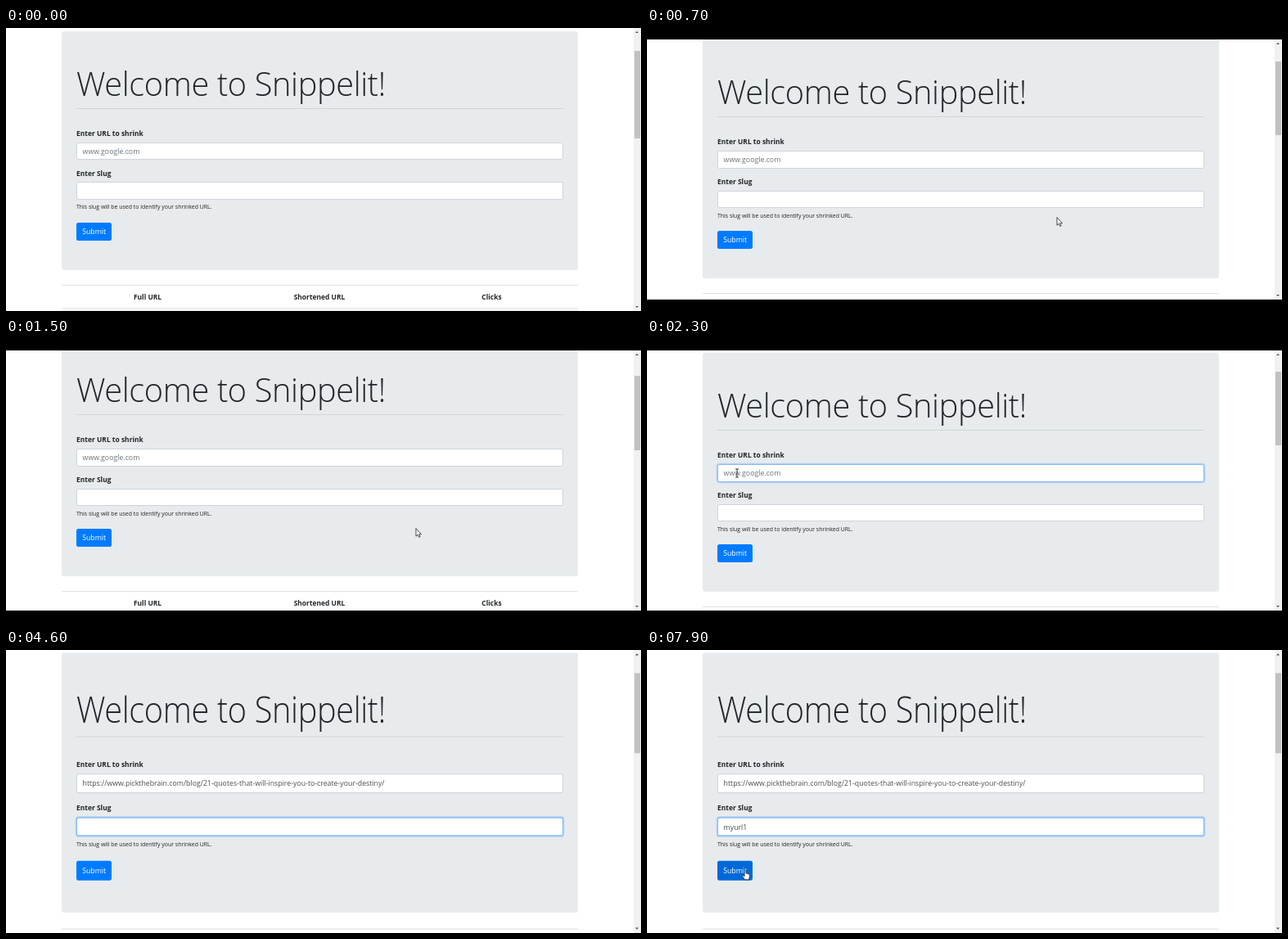
These frames come from a looping animation (776 by 346 pixels, 8000 ms). An HTML page:

```html
<!DOCTYPE html>
<html lang="en">
<head>
<meta charset="utf-8">
<title>Welcome to Snippelit!</title>
<style>
html, body { margin: 0; width: 100%; height: 100%; overflow: hidden; background: #000; }
#stage { position: absolute; left: 0; top: 0; width: 776px; height: 346px; overflow: hidden; background: #000; }
#view { position: absolute; left: 0; width: 776px; overflow: hidden; background: #fff; transform-origin: 0 0; }
#page { position: absolute; left: 0; top: 0; width: 767px; height: 500px;
  font: 8.78px/14px "Open Sans", "Noto Sans", sans-serif; color: #212529; }
#page div, #bar div, #cursors svg { position: absolute; box-sizing: border-box; white-space: nowrap; }
#page .jumbo { left: 68px; top: 14px; width: 631px; height: 292px; border-radius: 3px; background: #e7ebed; }
#page .title { left: 86px; top: 53px; font-size: 39.8px; line-height: 50px; font-weight: 300; letter-spacing: -.4px; }
#page .rule { left: 86px; width: 594.5px; top: 108px; height: 1px; background: #d2d5d8; }
#page .label { left: 86px; font-size: 8.45px; font-weight: 700; }
#page .field { left: 86px; width: 594.5px; height: 21.5px; padding-left: 6.6px; line-height: 21px;
  border: 1px solid #ced4da; border-radius: 2.5px; background: #fff; color: #495057; }
#page .hint { left: 86px; top: 222.5px; font-size: 6.95px; }
#page .button { left: 86px; top: 248.3px; width: 43.3px; height: 21.5px; border-radius: 2.5px;
  line-height: 22.5px; text-align: center; color: #fff; }
#page .line { left: 68px; width: 631px; background: #dee2e6; }
#page .head { top: 332px; width: 210px; text-align: center; font-size: 8.45px; font-weight: 700; }
#page .row { left: 68px; top: 354px; width: 631px; height: 40px; background: #f2f2f2; }
#page .link { top: 361px; color: #2f7de1; line-height: 13.3px; }
#caret { display: inline-block; width: 1px; height: 12px; background: #777; vertical-align: -2.5px; }
#bar { position: absolute; right: 0; top: 0; width: 9.5px; height: 100%; background: #f1f1f1; }
#thumb { left: 1.2px; width: 7.3px; background: #c1c1c1; }
.arrow { left: 2.6px; border: 2.2px solid transparent; }
.up { top: 1.6px; border-bottom: 2.6px solid #505050; }
.down { bottom: 1.6px; border-top: 2.6px solid #505050; }
#cursors svg { left: 0; top: 0; overflow: visible; width: 12px; height: 16px; }
</style>
</head>
<body>
<div id="stage">
  <div id="view">
    <div id="page">
      <div class="jumbo"></div>
      <div class="title">Welcome to Snippelit!</div>
      <div class="rule"></div>
      <div class="label" style="top:132px">Enter URL to shrink</div>
      <div class="field" id="url" style="top:150px"><span id="urlText"></span><span id="caret"></span></div>
      <div class="label" style="top:181px">Enter Slug</div>
      <div class="field" id="slug" style="top:198.7px"></div>
      <div class="hint">This slug will be used to identify your shrinked URL.</div>
      <div class="button" id="submit">Submit</div>
      <div class="line" style="top:324px;height:1px"></div>
      <div class="head" style="left:68px">Full URL</div>
      <div class="head" style="left:278px">Shortened URL</div>
      <div class="head" style="left:488.5px">Clicks</div>
      <div class="line" style="top:352.5px;height:1.2px"></div>
      <div class="row"></div>
      <div class="link" style="left:74.5px">https://www.pickthebrain.com/blog/21-quotes-<br>that-will-inspire-you-to-create-your-destiny/</div>
      <div class="link" style="left:284.5px">https://snippelit.herokuapp.com/api/myurl1</div>
      <div style="left:591px;top:361px">0</div>
    </div>
    <div id="bar"><div class="arrow up"></div><div id="thumb"></div><div class="arrow down"></div></div>
  </div>
  <div id="cursors">
    <svg id="arrow"><path d="M.5 .5V10.2L2.7 8.2L4.2 11.4L5.6 10.8L4.2 7.7H7Z" fill="#fff" stroke="#222" stroke-width=".8"/></svg>
    <svg id="beam"><path d="M-2 -5H2M0 -5V5M-2 5H2" fill="none" stroke="#222" stroke-width=".9"/></svg>
    <svg id="hand"><path d="M-.9 1Q0 -.6 1 1V4.5L5 5.6Q5.8 6 5.6 7.5L4.6 12.3H-.4L-3.4 8.2Q-3.6 6.6 -2 7.2L-.9 8.2Z" fill="#fff" stroke="#222" stroke-width=".8"/></svg>
  </div>
</div>
<script>
const $ = id => document.getElementById(id);
const LOOP = 8000, STEP = 100, FULL = 346, SHORT = 318;
const ADDRESS = "https://www.pickthebrain.com/blog/21-quotes-that-will-inspire-you-to-create-your-destiny/";

// [time, value] pairs
const scroll = [[900, 0], [1000, -8], [1100, -36], [1200, -53], [1300, -53], [1400, -38],
  [1500, -16], [1600, -4], [1700, 1], [1800, 3]];
const urlFocus = [[2100, 0], [2300, 1], [4100, 1], [4300, 0]];
const slugFocus = [[4100, 0], [4300, 1]];
const keys = [4700, 5000, 5400, 5600, 5800, 6300];

// [from, to, shape, x0, y0, x1, y1]
const moves = [
  [300, 1600, "arrow", 500.5, 231, 500.5, 231],
  [1600, 1900, "arrow", 500.5, 231, 415, 253],
  [1900, 2100, "arrow", 415, 253, 170, 180],
  [2100, 2600, "beam", 110, 164, 110, 164],
  [3300, 4100, "beam", 300, 166, 112, 217],
  [4100, 4500, "beam", 112, 217, 112, 217],
  [6900, 7100, "arrow", 270, 226, 294, 233],
  [7100, 7300, "arrow", 294, 233, 294, 233],
  [7300, 7700, "arrow", 294, 233, 132, 266],
  [7700, 8000, "hand", 120, 268.5, 120, 268.5]
];

const mix = (a, b, k) => a + (b - a) * k;

function at(track, t) {
  const i = track.findIndex(p => p[0] > t);
  if (i < 0) return track[track.length - 1][1];
  if (i === 0) return track[0][1];
  const [t0, a] = track[i - 1], [t1, b] = track[i];
  return mix(a, b, (t - t0) / (t1 - t0));
}

function focus(el, k) {
  el.style.borderColor = `rgb(${mix(206, 132, k)},${mix(212, 186, k)},${mix(218, 244, k)})`;
  el.style.boxShadow = `0 0 0 1.3px rgba(0,123,255,${.22 * k})`;
}

function drawView(t) {
  const tall = t < 100, zoomed = t >= 3000;
  const height = tall ? FULL : SHORT, shift = at(scroll, t);
  const view = $("view").style;
  view.top = tall || zoomed ? "0" : "14px";
  view.height = height + "px";
  view.transform = zoomed ? `scaleY(${FULL / SHORT})` : "none";
  $("page").style.top = (tall ? -10.3 : shift - 14) + "px";
  $("thumb").style.top = (tall ? 28 : 26.8 - shift / 3.6) + "px";
  $("thumb").style.height = (tall ? 107 : 90.5) + "px";
}

function drawForm(t) {
  const filled = t >= 2600;
  $("urlText").textContent = filled ? ADDRESS : "www.google.com";
  $("urlText").style.color = filled ? "" : "#6c757d";
  $("caret").style.visibility = filled && t < 3300 ? "visible" : "hidden";
  $("slug").textContent = "myurl1".slice(0, keys.filter(k => k <= t).length);
  focus($("url"), at(urlFocus, t));
  focus($("slug"), at(slugFocus, t));
  $("submit").style.background = t >= 7700 ? "#0069d9" : "#007bff";
}

function drawCursor(t) {
  const move = moves.find(m => t >= m[0] && t < m[1]);
  for (const id of ["arrow", "beam", "hand"]) $(id).style.display = "none";
  if (!move) return;
  const [from, to, shape, x0, y0, x1, y1] = move;
  const k = (t - from) / (to - from), style = $(shape).style;
  style.display = "block";
  style.transform = `translate(${mix(x0, x1, k)}px,${mix(y0, y1, k)}px)`;
}

const start = performance.now();
function frame() {
  const t = Math.floor((performance.now() - start) % LOOP / STEP) * STEP;
  drawView(t);
  drawForm(t);
  drawCursor(t);
  requestAnimationFrame(frame);
}
frame();
</script>
</body>
</html>
```
